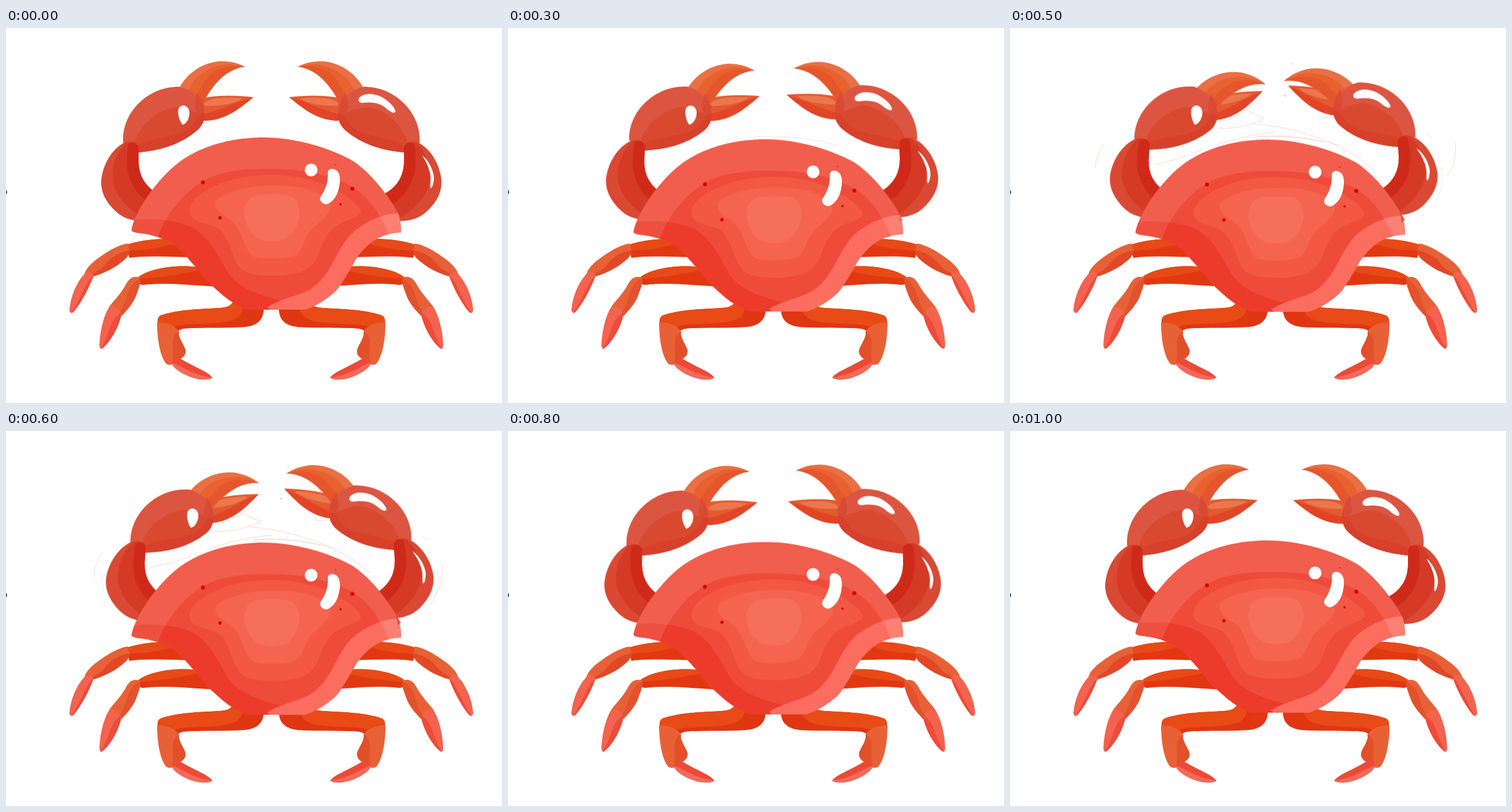
An HTML page that plays this animation: 860x651 px, repeating every 1100 ms.

```html
<!DOCTYPE html>
<html lang="en">
<head>
<meta charset="utf-8">
<title>Crab</title>
<style>
  html, body { margin: 0; width: 100%; height: 100%; overflow: hidden; background: #fff; }
  svg { display: block; width: 860px; height: 651px; }

  .move { animation: 1100ms step-end infinite; }
  .body { animation-name: body; }
  .arm { transform-origin: 222px 335px; }
  .hand { transform-origin: 215px 205px; }
  .upper { transform-origin: 303px 140px; }
  .lower { transform-origin: 324px 162px; }
  .left .arm { animation-name: armL; }
  .left .hand { animation-name: handL; }
  .left .upper { animation-name: upperL; }
  .left .lower { animation-name: lowerL; }
  .right .arm { animation-name: armR; }
  .right .hand { animation-name: handR; }
  .right .upper { animation-name: upperR; }
  .right .lower { animation-name: lowerR; }
  .near { animation-name: near; }
  .far { animation-name: far; }
  .arcL { animation-name: arcL; }
  .arcR { animation-name: arcR; }

  /* Eleven held poses; the way back mirrors the way in. */
  @keyframes body {
    0%, 90.9%, 100% { transform: none; }
    9.09%, 81.81% { transform: translateY(1.4px); }
    18.18%, 72.72% { transform: translateY(2.5px); }
    27.27%, 63.63% { transform: translateY(3.2px); }
    36.36% { transform: translateY(3.7px); }
  }
  @keyframes armL {
    0%, 90.9%, 100% { transform: none; }
    9.09%, 81.81% { transform: translate(.5px, -.3px) rotate(.2deg); }
    18.18%, 72.72% { transform: translate(1.5px, -1px) rotate(.5deg); }
    27.27%, 63.63% { transform: translate(2px, -2.5px) rotate(2.5deg); }
    36.36% { transform: translate(3.5px, -6px) rotate(4deg); }
  }
  @keyframes handL {
    0%, 90.9%, 100% { transform: none; }
    9.09%, 81.81% { transform: translate(.7px, 0) rotate(.4deg); }
    18.18%, 72.72% { transform: translate(2.3px, 0) rotate(1deg); }
    27.27%, 63.63% { transform: translate(6.6px, -4px) rotate(2.5deg); }
    36.36% { transform: translate(12.2px, -5.7px) rotate(3.5deg); }
  }
  @keyframes upperL {
    0%, 72.72%, 100% { transform: none; }
    27.27%, 63.63% { transform: rotate(1deg); }
    36.36% { transform: rotate(15.5deg); }
    45.45% { transform: translate(-2px, 0) rotate(11.5deg); }
    54.54% { transform: translate(-4px, 0) rotate(8deg); }
  }
  @keyframes lowerL {
    0%, 72.72%, 100% { transform: none; }
    27.27%, 63.63% { transform: rotate(-4deg); }
    36.36% { transform: rotate(-10deg); }
  }
  @keyframes armR {
    0%, 90.9%, 100% { transform: none; }
    9.09%, 81.81% { transform: translate(1.2px, -1px) rotate(.4deg); }
    18.18%, 72.72% { transform: translate(3.2px, -3px) rotate(1deg); }
    27.27%, 63.63% { transform: translate(6px, -7px) rotate(2.7deg); }
    36.36% { transform: translate(9px, -11px) rotate(4deg); }
  }
  @keyframes handR {
    0%, 90.9%, 100% { transform: none; }
    9.09%, 81.81% { transform: translate(1.2px, -1.3px) rotate(.6deg); }
    18.18%, 72.72% { transform: translate(3px, -3.6px) rotate(1.5deg); }
    27.27%, 63.63% { transform: translate(7.4px, -5.7px) rotate(2deg); }
    36.36% { transform: translate(14px, -9.6px) rotate(1.5deg); }
  }
  @keyframes upperR {
    0%, 72.72%, 100% { transform: none; }
    27.27%, 63.63% { transform: translate(-3px, 0) rotate(1deg); }
    36.36% { transform: translate(-7px, 0) rotate(3deg); }
    45.45% { transform: rotate(14deg); }
    54.54% { transform: translate(-4px, 0) rotate(5.5deg); }
  }
  @keyframes lowerR {
    0%, 72.72%, 100% { transform: none; }
    27.27%, 63.63% { transform: rotate(-3.3deg); }
    36.36% { transform: rotate(-9deg); }
  }
  @keyframes near {
    0%, 72.72%, 100% { opacity: 0; }
    27.27% { opacity: .35; }
  }
  @keyframes far {
    0%, 63.63%, 100% { opacity: 0; }
    36.36% { opacity: .5; }
  }
  @keyframes arcL {
    0%, 100% { transform: none; }
    45.45% { transform: translate(4px, 10px); }
    54.54% { transform: translate(9px, 20px); }
  }
  @keyframes arcR {
    0%, 100% { transform: none; }
    45.45% { transform: translate(19px, -40px); }
    54.54% { transform: translate(3px, -10px); }
  }
</style>
</head>
<body>
<svg viewBox="0 0 860 651" xmlns="http://www.w3.org/2000/svg">
  <defs>
    <g id="legs">
      <!-- top leg -->
      <path fill="#e23811" d="M207 377C235 367 275 364 300 367L332 398C290 398 250 394 214 399Z"/>
      <path fill="#e84a17" d="M207 377C235 367 275 364 300 367L312 374C280 374 265 384 235 385C222 385 214 387 210 388Z"/>
      <path fill="#e86136" d="M211 374C192 377 173 390 158 401C147 409 138 419 136 427C142 423 148 425 152 431C166 427 186 418 198 408C206 402 213 397 214 386Z"/>
      <path fill="#e24826" d="M214 386C190 390 178 402 170 413C163 421 156 422 150 427L152 431C166 427 186 418 198 408C206 402 213 397 214 386Z"/>
      <path fill="#f4634f" d="M136 427C141 421 148 423 152 429C148 441 135 471 117 493C113 496 110 494 110 489C112 466 122 442 136 427Z"/>
      <path fill="#ee4b38" d="M152 429C138 440 133 465 113 495L117 493C135 471 148 441 152 429Z"/>
      <!-- middle leg -->
      <path fill="#e23811" d="M231 431C255 415 300 411 330 415L367 449C320 447 280 441 238 446C228 446 226 437 231 431Z"/>
      <path fill="#e84a17" d="M229 433C255 415 300 411 330 415L340 419C310 425 285 432 232 435Z"/>
      <path fill="#e86136" d="M232 433C218 429 212 437 207 447C198 463 185 475 179 484C186 485 194 491 200 500C212 488 222 475 226 463C230 451 234 445 232 433Z"/>
      <path fill="#e2522c" d="M231 435C206 449 212 477 196 495L200 500C212 488 222 475 226 463C230 451 234 445 231 435Z"/>
      <path fill="#f4634f" d="M179 484C188 482 196 488 200 498C195 521 180 546 167 556C163 558 162 554 162 549C163 526 169 500 179 484Z"/>
      <path fill="#ee4b38" d="M198 495C178 509 183 526 164 557L167 556C180 546 195 521 200 498Z"/>
      <!-- bottom leg -->
      <path fill="#e03612" d="M396 470C392 482 385 485 370 486C340 488 300 488 268 499C262 503 262 510 264 514L296 529C300 523 306 521 325 521C360 520 390 521 415 519C437 516 447 506 447 486L440 470Z"/>
      <path fill="#e84b16" d="M396 470C392 482 385 485 370 486C340 488 300 488 268 499C262 503 262 510 264 514L292 519C310 512 345 515 375 511C402 507 412 498 411 478Z"/>
      <path fill="#e86136" d="M262 511C275 511 292 514 300 527C298 536 306 546 311 558C313 567 306 573 301 575C295 584 285 587 278 583C267 570 262 540 262 511Z"/>
      <path fill="#e2502a" d="M300 527C280 538 295 560 287 584C295 583 298 578 301 575C306 573 313 567 311 558C306 546 298 536 300 527Z"/>
      <path fill="#ec4a37" d="M287 581C290 573 300 572 306 576C325 588 350 596 358 607C350 613 330 610 318 605C304 599 290 591 287 581Z"/>
      <path fill="#f5695a" d="M287 581C302 584 320 602 358 607C350 613 330 610 318 605C304 599 290 591 287 581Z"/>
    </g>

    <g id="arm">
      <path fill="#d94934" d="M203 200C212 195 226 197 230 206L230 235C231 255 240 275 264 288L262 328L236 335C210 335 195 324 185 313C172 299 165 285 165 268C166 245 178 215 203 200Z"/>
      <path fill="#d43a26" d="M207 200C216 195 227 198 230 206L230 235C231 255 240 275 264 288L258 325L238 331C212 314 190 292 186 268C182 240 193 215 207 200Z"/>
      <path fill="#cf2a19" d="M212 202C221 196 229 200 230 208L230 235C231 255 240 275 264 288L250 305C226 290 208 262 210 228C210 216 211 208 212 202Z"/>
    </g>

    <g id="palm">
      <path fill="#dc5541" d="M203 199C201 164 221 130 256 112C272 104 288 102 300 102C320 106 339 122 343 138C345 155 342 168 333 176C302 204 262 213 230 216Z"/>
      <path fill="#d8492f" d="M222 213C222 180 250 150 285 139C305 133 325 150 344 147C345 160 340 170 333 176C302 204 262 213 230 216Z"/>
      <path fill="#d7402b" d="M344 148C326 148 337 166 305 181C280 191 252 190 226 206L230 216C262 213 302 204 333 176C340 168 345 160 344 148Z"/>
      <path fill="#d94a35" d="M330 113C337 120 343 130 344 148C335 150 328 146 327 138C327 128 331 120 330 113Z"/>
    </g>

    <g id="upper">
      <path fill="#e96f44" d="M300 105C312 81 338 61 368 58C388 57 402 61 414 67C385 70 360 95 344 126L328 146L303 125Z"/>
      <path fill="#e8612f" d="M317 108C325 84 352 66 384 63C396 63 406 65 414 67C385 70 360 95 344 126L328 140Z"/>
      <path fill="#e5562c" d="M331 114C346 96 346 78 379 69C390 65 402 66 414 67C385 70 360 95 344 126L332 135Z"/>
    </g>

    <g id="lower">
      <path fill="#e45a30" d="M340 122C368 116 400 117 429 120C405 140 380 161 342 161L330 148Z"/>
      <path fill="#ec774e" d="M343 131C356 118 390 121 410 122C400 131 370 136 345 135Z"/>
      <path fill="#e14526" d="M429 120C405 140 380 161 342 161L340 150C370 144 395 129 429 120Z"/>
    </g>

    <path id="shell" d="M218 349C224 318 260 264 300 233C345 200 400 190 447 190C500 190 560 207 602 231C640 257 672 305 681 324C684 335 685 345 685 355C650 356 628 371 606 402C592 428 578 450 572 456C550 477 525 487 518 489L420 489C395 481 376 465 350 440C330 416 310 392 295 378C275 364 250 358 232 356C222 355 216 353 218 349Z"/>
    <path id="inner" d="M263 364C280 315 320 270 365 255C400 244 440 243 475 245C525 246 560 257 590 270C625 287 646 315 664 360L668 500L264 500Z"/>
    <path id="shade" d="M210 335C250 328 300 334 325 347C355 365 370 400 385 425C405 455 450 468 495 477L470 500L200 500Z"/>
    <path id="shine" d="M690 322C650 320 617 340 598 358C570 388 565 430 527 454C502 467 470 472 453 485L470 500L690 500Z"/>
    <clipPath id="inShell"><use href="#shell"/></clipPath>
    <clipPath id="inInner"><use href="#inner"/></clipPath>
  </defs>

  <rect width="860" height="651" fill="#fff"/>
  <circle cx="-2.5" cy="285" r="4.5" fill="#2f4f4a"/>

  <use href="#legs"/>
  <use href="#legs" transform="translate(920) scale(-1 1)"/>

  <g class="left">
    <g class="move hand">
      <use class="move lower" href="#lower"/>
      <use class="move upper" href="#upper"/>
      <use href="#palm"/>
      <path fill="#fff" d="M299 140C303 132 315 132 318 145C319 157 312 167 306 168C300 160 297 148 299 140Z"/>
    </g>
    <use class="move arm" href="#arm"/>
  </g>

  <g class="right" transform="translate(920) scale(-1 1)">
    <g class="move hand">
      <use class="move lower" href="#lower"/>
      <use class="move upper" href="#upper"/>
      <use href="#palm"/>
      <path fill="#fff" d="M308 122C302 113 285 112 270 119C255 127 244 140 245 146C248 149 252 146 258 142C270 130 285 128 302 130C308 130 310 126 308 122Z"/>
    </g>
    <g class="move arm">
      <use href="#arm"/>
      <path fill="#fff" d="M198 221C186 231 178 249 178 262C179 273 182 279 184 278C186 272 181 260 187 245C190 234 195 228 198 221Z"/>
    </g>
  </g>

  <g class="move body">
    <use href="#shell" fill="#f15e4d"/>
    <g clip-path="url(#inShell)">
      <use href="#shade" fill="#ee5040"/>
      <use href="#shine" fill="#fc8073"/>
      <g clip-path="url(#inInner)">
        <use href="#inner" fill="#ef4b3a"/>
        <use href="#shade" fill="#ec3a2b"/>
        <use href="#shine" fill="#fb6d5f"/>
      </g>
    </g>
    <path fill="#f35845" d="M318 320C316 298 345 280 380 267C410 257 440 255 462 255C515 255 555 270 585 289C602 300 617 313 615 321C610 332 580 334 565 350C545 370 545 395 531 411C515 427 485 431 460 430C435 430 415 427 404 414C392 398 390 372 373 352C360 337 322 342 318 320Z"/>
    <path fill="#f5644f" d="M363 305C363 294 385 286 410 279C435 273 475 272 505 276C535 281 563 294 563 310C563 325 540 338 528 352C516 368 515 385 504 393C490 402 440 402 428 396C414 386 412 362 398 342C386 327 363 322 363 305Z"/>
    <path fill="#f66f58" d="M413 322C412 306 421 293 435 290C452 288 475 288 490 290C503 294 509 306 509 322C508 340 500 354 488 364C477 372 446 373 434 363C421 353 414 337 413 322Z"/>
    <g fill="#fff">
      <circle cx="529" cy="246.5" r="11"/>
      <path d="M558 250C560 243 569 243 575 249C580 255 580 267 577 279C574 292 566 303 556 306C548 306 543 299 545 294C550 285 559 274 558 250Z"/>
    </g>
    <g fill="#d40808">
      <circle cx="341.5" cy="268" r="3.4"/>
      <circle cx="371" cy="329.5" r="2.9"/>
      <circle cx="600.5" cy="279" r="3.6"/>
      <circle cx="580" cy="306" r="2.1"/>
      <circle cx="571.5" cy="237.5" r="1.1"/>
    </g>
  </g>

  <!-- faint trails left behind by the moving parts -->
  <g fill="none" stroke="#e88a7c" stroke-width=".7">
    <g class="move near" opacity="0">
      <path d="M425 189C480 186 530 192 572 204M166 245C165 258 167 270 170 279M748 240C752 265 748 288 735 303M354 162C380 162 410 146 434 124"/>
      <path fill="#d0402c" stroke="none" d="M677 322L685 333L680 336Z"/>
    </g>
    <g class="move far" opacity="0">
      <path d="M420 166C500 173 580 200 632 247M352 205C390 191 430 183 460 181M362 174C390 176 420 168 441 157L404 141M250 237C280 231 310 222 333 211M534 154C543 156 552 156 560 154M430 189C470 185 510 190 545 198M723 183L732 191"/>
      <path class="move arcL" d="M159 191C149 205 144 219 144 233"/>
      <path class="move arcR" d="M753 240C755 265 750 286 738 297"/>
      <path fill="#d0402c" stroke="none" d="M676 319L685 333L679 338ZM474 115L479 118L477 119ZM488 61L491 62L489 63Z"/>
    </g>
  </g>
</svg>
</body>
</html>
```
